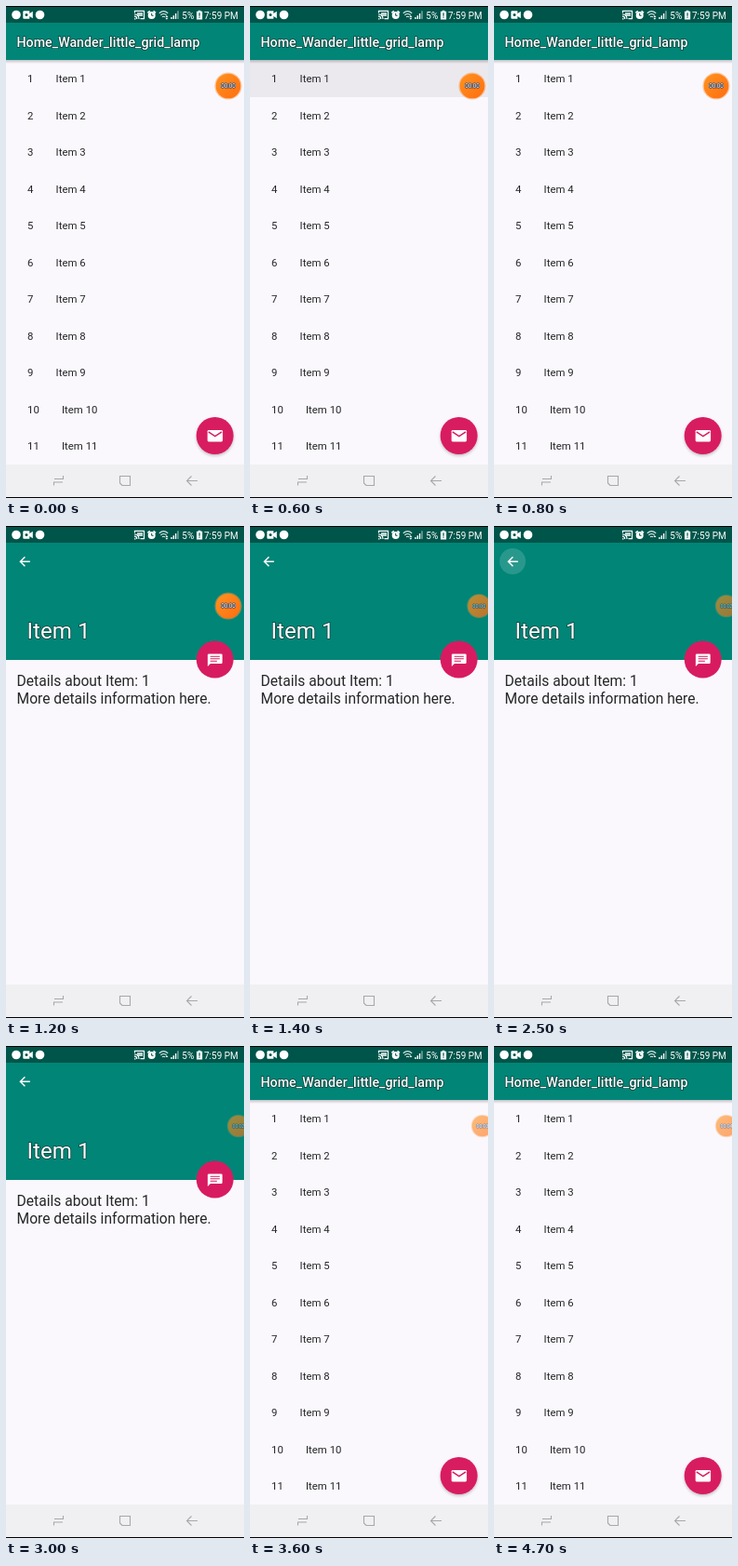
These frames come from a looping animation (256x529 px, 5100 ms). An HTML page:

```html
<!DOCTYPE html>
<html lang="en">
<head>
<meta charset="utf-8">
<title>List and detail</title>
<style>
  html, body { margin: 0; width: 100%; height: 100%; overflow: hidden; }
  svg { display: block; width: 100vw; height: 100vh; }
  text { font-family: Roboto, sans-serif; fill: #262628; white-space: pre; }
  .line { fill: none; stroke: #fff; }
  .outlined { fill: #fff; stroke: #073f39; stroke-width: 1.5; stroke-linejoin: round; paint-order: stroke; }
  .status text { fill: #fff; font-size: 10px; }
  .body { font-size: 15.64px; }
  .row { font-size: 11.38px; }
</style>
</head>
<body>
<svg viewBox="0 0 256 529" preserveAspectRatio="none">
  <defs>
    <linearGradient id="shade" x2="0" y2="1">
      <stop stop-color="#000" stop-opacity=".22"/>
      <stop offset="1" stop-color="#000" stop-opacity="0"/>
    </linearGradient>
    <linearGradient id="orange" x2="1" y2="1">
      <stop stop-color="#ff931f"/>
      <stop offset="1" stop-color="#ff6d10"/>
    </linearGradient>
    <filter id="drop" x="-30%" y="-30%" width="160%" height="170%">
      <feDropShadow dx="0" dy="1.5" stdDeviation="1.5" flood-opacity=".25"/>
    </filter>
    <circle id="fab" r="20" fill="#d81b60"/>
  </defs>

  <rect width="256" height="529" fill="#faf8fd"/>

  <g id="list">
    <rect id="press" y="58" width="256" height="40" opacity=".06"/>
    <g id="rows"></g>
    <rect y="58" width="256" height="4" fill="url(#shade)"/>
    <rect y="18" width="256" height="40" fill="#008577"/>
    <text class="outlined" x="11.5" y="43.5" font-size="14.22" font-weight="500">Home_Wander_little_grid_lamp</text>
    <g transform="translate(224.7 462)">
      <use href="#fab" filter="url(#drop)"/>
      <rect x="-8" y="-6" width="16.4" height="12.4" rx="1.3" fill="#fff"/>
      <path class="line" d="M-7 -4.2L.2 .6L7.4 -4.2" style="stroke:#d81b60" stroke-width="1.5"/>
    </g>
  </g>

  <g id="detail">
    <rect y="18" width="256" height="126" fill="#008577"/>
    <circle id="ripple" cx="20" cy="38" r="14" fill="#fff" opacity=".16"/>
    <path class="line" d="M25.8 38.3H15.6M20.4 33.3L15.4 38.3L20.4 43.3" stroke-width="1.5"/>
    <text class="outlined" x="22.5" y="121" font-size="24.2">Item 1</text>
    <text class="body" x="11.5" y="172">Details about Item: 1</text>
    <text class="body" x="11.5" y="190.5">More details information here.</text>
    <g transform="translate(224.7 143.6)">
      <use href="#fab"/>
      <path d="M-6.6 -6.2H6.8Q8 -6.2 8 -5V3.2Q8 4.4 6.8 4.4H-4.8L-7.8 7.4V-5Q-7.8 -6.2 -6.6 -6.2Z" fill="#fff"/>
      <path class="line" d="M-5 -3.4H5.2M-5 -.9H5.2M-5 1.6H2.2" style="stroke:#d81b60" stroke-width="1.1"/>
    </g>
  </g>

  <g class="status">
    <rect width="256" height="18" fill="#00554a"/>
    <circle cx="11" cy="9.5" r="4.8" fill="#fff"/>
    <path d="M19.3 5.2H25.3V8L28.8 5.8V13.2L25.3 11V13.8H19.3Q18.3 13.8 18.3 12.8V6.2Q18.3 5.2 19.3 5.2Z" fill="#fff"/>
    <circle cx="22" cy="9.5" r="1.5" fill="#00554a"/>
    <circle cx="36.5" cy="9.5" r="4.8" fill="#fff"/>
    <path class="line" d="M138.5 7.5V5.3H148.5V13.7H144.5M138 13.8H139.5M138 11.2Q140.8 11.2 140.8 14M138 9Q143 9 143 14" stroke-width="1.2"/>
    <rect x="141" y="7" width="6" height="4" fill="#fff" opacity=".75"/>
    <circle cx="156.7" cy="10" r="4" fill="#fff"/>
    <path class="line" d="M152.4 7.4L154.8 5.2M158.6 5.2L161 7.4" stroke-width="1.5"/>
    <path class="line" d="M156.7 7.8V10.3H158.6" style="stroke:#00554a"/>
    <path class="line" d="M164.8 7.7Q169.5 3.7 174.2 7.7M166.4 9.8Q169.5 7.2 172.6 9.8M168 11.8Q169.5 10.7 171 11.8" stroke-width="1.2" opacity=".85"/>
    <path d="M171.4 12L172.9 10L174.4 12Z" fill="#fff"/>
    <path id="traffic" d="M171.4 12.8H174.4L172.9 14.8Z" fill="#fff"/>
    <path class="line" d="M178 14V12M180.3 14V10.2M182.6 14V8" stroke-width="1.4"/>
    <path class="line" d="M185 14V5.3" stroke-width="1.4" opacity=".5"/>
    <text x="189.3" y="13.5">5%</text>
    <path d="M205 5.8H206.8V4.7H209.4V5.8H211.2V14.4H205Z" fill="#fff"/>
    <path class="line" d="M208.1 7.3V10.7M208.1 11.6V12.8" style="stroke:#00554a" stroke-width="1.2"/>
    <text x="213" y="13.5">7:59 PM</text>
  </g>

  <g id="orb">
    <circle r="14.6" fill="#ff9440" opacity=".5"/>
    <circle r="13.3" fill="url(#orange)"/>
    <text id="clock" class="outlined" y="2.2" font-size="6.3" text-anchor="middle" style="stroke:#303c58;stroke-width:1.2"></text>
  </g>

  <rect y="493" width="256" height="36" fill="#f0eff1"/>
  <path fill="none" stroke="#a8a7aa" stroke-width="1.1"
    d="M52 508.5H61.5V505M51.5 515.5V512H61M122.5 505.5H133.5V515.5H125L122.5 513ZM206 510.5H194.8M199.5 505.5L194.5 510.5L199.5 515.5"/>
  <path d="M0 0H256V1H0ZM0 528H256V529H0Z"/>
</svg>
<script>
  const $ = id => document.getElementById(id);
  const show = (id, on) => $(id).style.display = on ? '' : 'none';
  const within = (t, from, to) => t >= from && t < to;
  const ticks = [1500, 2500, 3600, 4700];

  let rows = '';
  for (let i = 1; i <= 11; i++) {
    const y = 42.6 + i * 39.5;
    rows += `<text class="row" x="23" y="${y}">${i}</text>` +
            `<text class="row" x="${i < 10 ? 53.6 : 60}" y="${y}">Item ${i}</text>`;
  }
  $('rows').innerHTML = rows;

  function draw(now) {
    const t = Math.floor(now % 5100 / 100) * 100;
    const detail = within(t, 1200, 3600);
    show('detail', detail);
    show('list', !detail);
    show('press', within(t, 600, 800));
    show('ripple', within(t, 2500, 2700));
    show('traffic', t < 2000);

    // The floating timer docks at the edge, shrinking and fading.
    const dock = Math.min(1, Math.max(0, (t - 1200) / 300));
    $('orb').setAttribute('transform', `translate(${239 + 11 * dock} 86) scale(${1 - .16 * dock})`);
    $('orb').setAttribute('opacity', 1 - .4 * dock);
    $('clock').textContent = '00:0' + ticks.filter(at => t >= at).length;
    requestAnimationFrame(draw);
  }
  draw(0);
</script>
</body>
</html>
```
